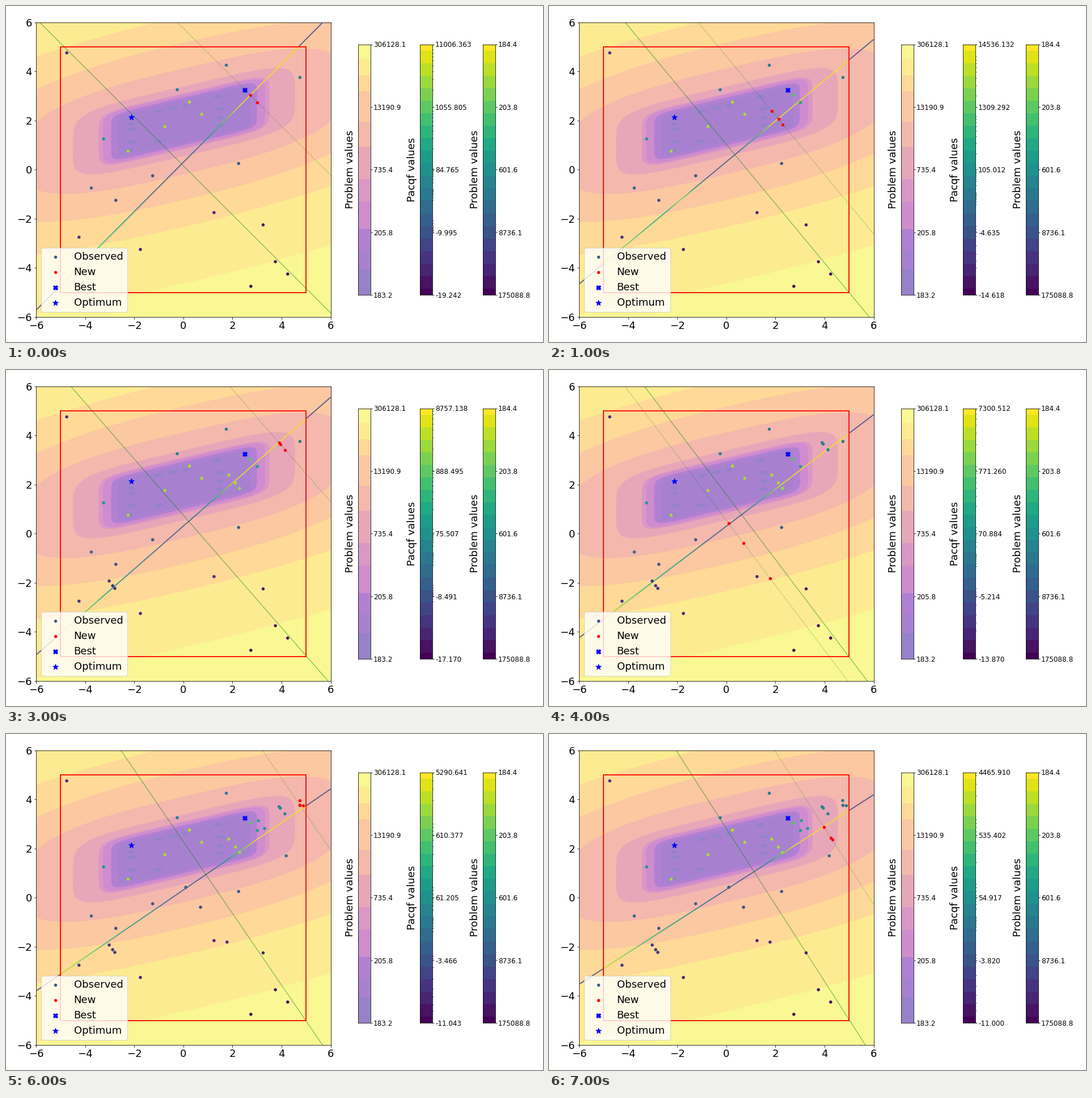
Animation of 947x592 px, one loop 8 s. Source, as a matplotlib script:

```python
import numpy as np
import matplotlib.pyplot as plt
from matplotlib.animation import FuncAnimation
from matplotlib.collections import LineCollection
from matplotlib.patches import Ellipse, Polygon, Rectangle

W, H, DPI = 947, 592, 72
plt.rcParams["font.family"] = "DejaVu Sans"
viridis, plasma = plt.get_cmap("viridis"), plt.get_cmap("plasma")

# Nested level sets: half width, half height, squareness, colour position
RINGS = [
    (27.7, 6.6, 2, .92), (15.4, 4.3, 2.2, .83), (9.2, 3.2, 2.5, .74),
    (6.65, 2.15, 3, .64), (4.52, 1.42, 5, .53), (3.48, 1.14, 7, .42),
    (3.3, 1.08, 8, .34), (2.97, .97, 9, .19), (2.7, .86, 16, .13),
]
CENTER, SHEAR = (0.03, 1.97), 0.234

# Shallow pits on the plateau
PITS = [(-2.13, 1.85), (-2.1, 1.65), (-2.1, 1.13), (-2.2, .78), (-1, 2.37),
        (-.4, 2.5), (.1, 2.6), (1.4, 2.97), (1.5, 2.48), (1.53, 2.12),
        (1.5, 1.8), (-1.02, 1.15)]

START_X = [-4.75, 1.75, 4.75, -.25, .25, .75, -.75, -3.25, -2.25, 2.25,
           -1.25, -3.75, -2.75, 1.25, 3.25, -4.25, -1.75, 3.75, 4.25, 2.75]
START_T = [.12, .4, .4, .43, .88, .87, .87, .54, .87, .28,
           .28, .34, .23, .12, .08, .14, .09, .04, .02, .02]

# Each batch of new points: x, y, colour position once observed
BATCHES = [
    [(2.5, 3.24, .9), (2.73, 3.03, .73), (3.02, 2.73, .58)],
    [(1.85, 2.38, .87), (2.12, 2.06, .87), (2.29, 1.84, .84)],
    [(-3.02, -1.93, .16), (-2.88, -2.12, .16), (-2.79, -2.23, .15)],
    [(3.9, 3.7, .45), (3.95, 3.64, .45), (4.14, 3.41, .44)],
    [(.1, .42, .3), (.7, -.39, .23), (1.78, -1.81, .13)],
    [(3.06, 3.13, .6), (3.31, 2.81, .54), (4.19, 1.7, .38)],
    [(4.74, 3.95, .4), (4.75, 3.76, .4), (4.89, 3.74, .39)],
    [(3.98, 2.87, .5), (4.26, 2.43, .45), (4.32, 2.36, .45)],
]

# Search line: slope, intercept, and where its normal meets the top edge
LINES = [
    (1.0026, .296, -5.86), (.8297, .318, -4.13), (.7584, .352, -3.39),
    (.874, .306, -4.59), (.757, .3, -3.34), (.791, .2025, -3.6),
    (.685, .31, -2.55), (.643, .33, -2.05),
]

# Valley along the search line: start, end, far rim, bump position and height
VALLEYS = [
    (-1.1, .3, 2.3, -3, .03), (-.8, .4, 1.9, -1.8, .35), None,
    (-.9, .3, 2.2, -2.8, -.12), (-.8, .6, 2.3, -2, .1),
    (-.5, .9, 2.6, -2.1, .08), (-.4, 1, 2.9, -1.5, .04),
    (-.4, 1.1, 2.7, -1.4, .04),
]

# Dips of the oscillating search line: centre, half width, colour position
DIPS = [(-4.2, .06, .4), (-2.75, .2, .28), (-1.68, .05, .5), (-1.03, .05, .5),
        (-.44, .05, .5), (.12, .13, .3), (.65, .25, .3), (4.72, .05, .4)]

# Middle ticks and ends of the second colour bar
SCALES = [
    (-19.242, -9.995, 84.765, 1055.805, 11006.363),
    (-14.618, -4.635, 105.012, 1309.292, 14536.132),
    (-11.000, .922, 154.970, 2145.539, 27867.062),
    (-17.170, -8.491, 75.507, 888.495, 8757.138),
    (-13.870, -5.214, 70.884, 771.260, 7300.512),
    (-11.089, -3.138, 68.033, 705.085, 6407.385),
    (-11.043, -3.466, 61.205, 610.377, 5290.641),
    (-11.000, -3.820, 54.917, 535.402, 4465.910),
]
QUARTERS = np.linspace(0, 1, 5)


def pastel(t):
    return tuple(.5 + .5 * np.array(plasma(t)[:3]))


def add_axes(x, y, w, h):
    return fig.add_axes([x / W, 1 - (y + h) / H, w / W, h / H])


def ring_outline(a, b, n):
    s = np.linspace(0, 2 * np.pi, 600)
    u = a * np.sign(np.cos(s)) * np.abs(np.cos(s)) ** (2 / n)
    v = b * np.sign(np.sin(s)) * np.abs(np.sin(s)) ** (2 / n)
    return np.column_stack([CENTER[0] + u, CENTER[1] + v + SHEAR * u])


def line_tone(i, x):
    if VALLEYS[i] is None:
        tone = np.full_like(x, .86)
        for mid, half, t in DIPS:
            tone[np.abs(x - mid) < half] = t
        return tone
    start, end, rim, bump, height = VALLEYS[i]
    tone = np.interp(x, [-5, start, end, rim], [.92, .29, .29, .97])
    return tone + height * np.exp(-((x - bump) / .55) ** 2)


def color_bar(x, edges, colors, label, ticks):
    bar = add_axes(x, 67.5, 22, 441.5)
    for low, high, color in zip(edges[:-1], edges[1:], colors):
        bar.add_patch(Rectangle((0, low), 1, high - low, fc=color, lw=0,
                                antialiased=False))
    bar.set(xlim=(0, 1), ylim=(0, 1), xticks=[])
    bar.yaxis.tick_right()
    bar.tick_params(labelsize=12, length=3, pad=2)
    bar.set_yticks(QUARTERS, ticks)
    fig.text((x - 14) / W, 1 - 288 / H, label, rotation=90, fontsize=18,
             ha="center", va="center")
    return bar


def symlog(v):
    v = np.asarray(v, float)
    return np.sign(v) * np.log10(1 + np.abs(v))


def minor_positions(scale):
    steps = np.outer(10.0 ** np.arange(5), np.arange(2, 10)).ravel()
    steps = np.concatenate([-steps, steps])
    steps = steps[(steps > scale[0]) & (steps < scale[-1])]
    return np.interp(symlog(steps), symlog(scale), QUARTERS)


fig = plt.figure(figsize=(W / DPI, H / DPI), dpi=DPI, facecolor="white")
ax = add_axes(53, 28.5, 519.5, 519.5)
ax.set(xlim=(-6, 6), ylim=(-6, 6), facecolor=pastel(.98))
ax.set_xticks(range(-6, 7, 2))
ax.set_yticks(range(-6, 7, 2))
ax.tick_params(labelsize=18)

for a, b, n, t in RINGS:
    ax.add_patch(Polygon(ring_outline(a, b, n), fc=pastel(t), lw=0, zorder=1))
for k, (x, y) in enumerate(PITS):
    ax.add_patch(Ellipse((x, y), .3 + .05 * (k % 3), .15, angle=8,
                         fc=pastel(.06), lw=0, zorder=1))

search = LineCollection([], cmap=viridis, lw=1.8, zorder=3)
search.set_clim(0, 1)
ax.add_collection(search)
normal, = ax.plot([], [], color="green", lw=1, alpha=.6, zorder=2.5)
slice_line, = ax.plot([], [], color="green", lw=.9, alpha=.3, zorder=2.5)
ax.add_patch(Rectangle((-5, -5), 10, 10, fill=False, ec="red", lw=1.8,
                       zorder=3.5))

seen = ax.scatter([], [], s=20, c=[], cmap=viridis, vmin=0, vmax=1, zorder=4)
new = ax.scatter([], [], s=20, color="red", zorder=4.2, label="New")
best = ax.scatter([2.5], [3.24], s=64, color="blue", marker="X", zorder=4.5,
                  label="Best")
optimum = ax.scatter([-2.11], [2.12], s=100, color="blue", marker="*",
                     zorder=4.5, label="Optimum")
seen_key = ax.scatter([], [], s=20, color=viridis(.27), label="Observed")
ax.legend(handles=[seen_key, new, best, optimum], loc="lower left",
          fontsize=18).set_zorder(6)

edges = (509 - np.array([509, 464, 430, 393, 345, 305, 248, 204, 150, 122,
                         93, 67])) / 442
tones = [.06] + [ring[3] for ring in RINGS[::-1]] + [.98]
steps = np.linspace(0, 1, 21)
step_edges = np.concatenate([[0], (steps[:-1] + steps[1:]) / 2, [1]])
step_colors = [viridis(t) for t in steps]

color_bar(621, edges, [pastel(t) for t in tones], "Problem values",
          ["183.2", "205.8", "735.4", "13190.9", "306128.1"])
acq_bar = color_bar(730, step_edges, step_colors, "Pacqf values", [""] * 5)
color_bar(841, step_edges, step_colors, "Problem values",
          ["175088.8", "8736.1", "601.6", "203.8", "184.4"])

first = np.column_stack([START_X, 4.75 - .5 * np.arange(20), START_T])


def update(i):
    slope, shift, top_x = LINES[i]
    xs = np.linspace(-6, 6, 601)
    ys = shift + slope * xs
    pts = np.column_stack([xs, ys])
    search.set_segments(np.stack([pts[:-1], pts[1:]], axis=1))
    tone = line_tone(i, xs)
    tone[(np.abs(xs) > 5) | (np.abs(ys) > 5)] = .23
    search.set_array(tone[:-1])

    ends = np.array([-7, 7])
    normal.set_data(ends, 6 - (ends - top_x) / slope)
    px, py, _ = BATCHES[i][1]
    slice_line.set_data(ends, py - (ends - px) / slope)

    known = np.vstack([first] + [np.array(b) for b in BATCHES[:i]])
    seen.set_offsets(known[:, :2])
    seen.set_array(known[:, 2])
    new.set_offsets(np.array(BATCHES[i])[:, :2])

    acq_bar.set_yticks(QUARTERS, [f"{v:.3f}" for v in SCALES[i]])
    acq_bar.set_yticks(minor_positions(SCALES[i]), minor=True)
    return search, normal, slice_line, seen, new


anim = FuncAnimation(fig, update, frames=8, init_func=lambda: update(0),
                     interval=1000, repeat=True, repeat_delay=0, blit=False)
plt.show()
```
